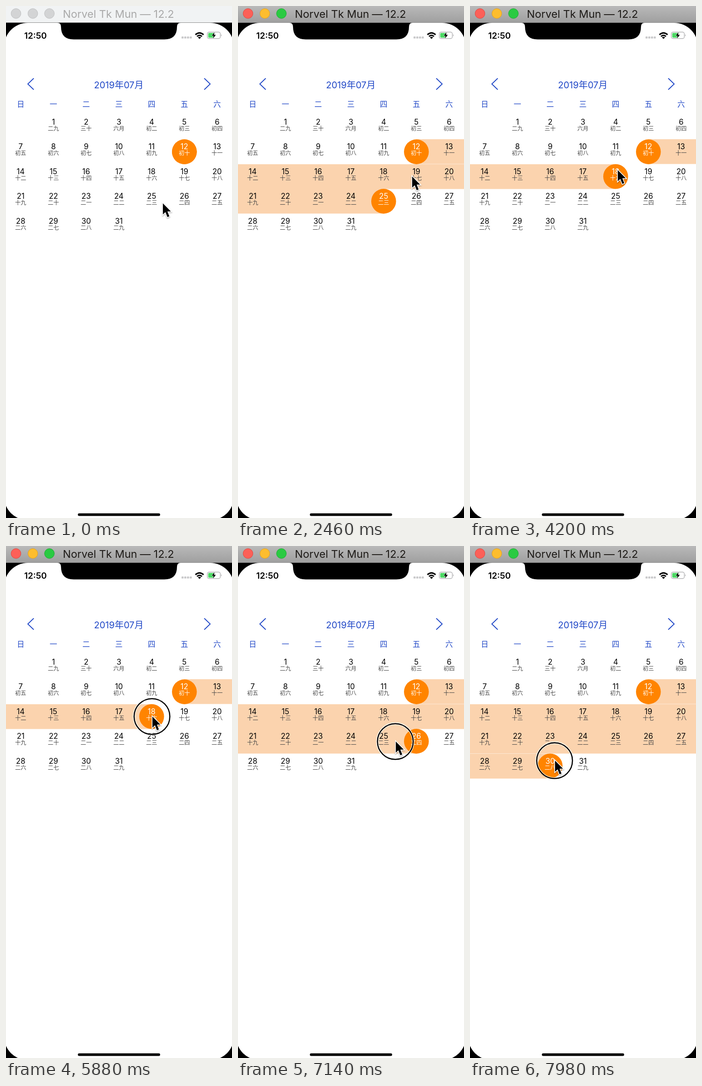
Write an HTML page that moves like this. It is 497 by 1126 pixels and loops after 8 s.

```html
<!DOCTYPE html>
<html lang="zh">
<head>
<meta charset="utf-8">
<style>
html, body { margin: 0; width: 100%; height: 100%; overflow: hidden; background: #fff; }
svg { display: block; width: 497px; height: 1126px; }
text { font-family: Inter, "Noto Sans CJK SC", "Noto Sans CJK", sans-serif; }
.mid { text-anchor: middle; }
.blue { fill: #2148c7; }
.day { font-size: 16.6px; }
.lunar { font-size: 12.2px; font-weight: 300; }
.title { font-size: 23.5px; }
</style>
</head>
<body>
<svg viewBox="0 0 497 1126" xmlns="http://www.w3.org/2000/svg">
  <defs>
    <linearGradient id="metal" x1="0" y1="0" x2="0" y2="1">
      <stop offset="0" stop-color="#b9b9b9"/><stop offset="1" stop-color="#9f9f9f"/>
    </linearGradient>
    <filter id="shade" x="-50%" y="-30%" width="200%" height="170%">
      <feDropShadow dx="0" dy="1.5" stdDeviation="1.3" flood-opacity=".4"/>
    </filter>
  </defs>
  <rect width="497" height="1126"/>
  <rect id="bar" width="497" height="36.5"/>
  <rect y="36" width="497" height="1" fill="#8c8c8c"/>
  <g id="lights"></g>
  <g id="title" class="title">
    <text x="125" y="26">Norvel Tk Mun</text>
    <text x="294.5" y="26">— 12.2</text>
  </g>
  <rect x="-4.5" y="37" width="506" height="1094" rx="53" fill="#fff"/>
  <path d="M113 37Q121 37 121 46Q121 73.500 149 73.500H348Q376 73.500 376 46Q376 37 384 37Z"/>
  <text x="40" y="72" font-size="18.8" font-weight="600">12:50</text>
  <g fill="#c9c9cb">
    <rect x="386" y="67" width="4.6" height="4.6" rx="1.2"/><rect x="392" y="67" width="4.6" height="4.6" rx="1.2"/>
    <rect x="398" y="67" width="4.6" height="4.6" rx="1.2"/><rect x="404" y="67" width="4.6" height="4.6" rx="1.2"/>
  </g>
  <g fill="none" stroke="#000" stroke-width="3">
    <path d="M416.5 63.2Q425.5 55 434.5 63.2"/><path d="M420 67Q425.5 62 431 67"/>
  </g>
  <path d="M422 69Q425.5 66.5 429 69L425.5 72.5Z"/>
  <rect x="442.7" y="57.3" width="28.6" height="14.4" rx="4" fill="#fff" stroke="#a5a5a7" stroke-width="1.2"/>
  <rect x="444.7" y="59.3" width="13.5" height="10.4" rx="2" fill="#4cd964"/>
  <path d="M473 62Q475.5 64.5 473 67Z" fill="#a5a5a7"/>
  <path d="M458.5 57.5L452.5 65.5H456.5L455 71.5L461.5 63.5H457.5Z" stroke="#fff" stroke-width="1" paint-order="stroke"/>
  <g fill="none" stroke="#2148c7" stroke-width="1.9">
    <path d="M61 159L48 171.5L61 184"/><path d="M436 159L449 171.5L436 184"/>
  </g>
  <text class="mid blue" x="248" y="181" font-size="20">2019年07月</text>
  <g id="bands" fill="#fbd3ae"></g>
  <g fill="#ff8400"><circle id="from" r="27.3"/><circle id="to" r="27.3"/></g>
  <g id="grid"></g>
  <rect x="158" y="1115.7" width="181" height="5.8" rx="2.9"/>
  <g id="ring" fill="none">
    <circle r="39.4" stroke="#fff" stroke-width="5.5" stroke-opacity=".75"/>
    <circle r="39.3" stroke="#000" stroke-width="2.5"/>
  </g>
  <path id="arrow" filter="url(#shade)" stroke="#fff" stroke-width="3" paint-order="stroke" d="M0 0V24.5L5.600 19.300L10 30.200L14.200 28.400L10 17.800H17.500Z"/>
</svg>
<script>
const NS = 'http://www.w3.org/2000/svg';
const $ = id => document.getElementById(id);
function add(parent, tag, attrs, text) {
  const el = document.createElementNS(NS, tag);
  for (const k in attrs) el.setAttribute(k, attrs[k]);
  if (text) el.textContent = text;
  parent.appendChild(el);
  return el;
}

const LOOP = 8000, STEP = 60, LEFT = 32.3, COL = 72, ROW = 54.4, TOP = 239, START = 12;
const NUM = '〇一二三四五六七八九十';
const colX = d => LEFT + COL * (d % 7);
const rowY = d => TOP + ROW * Math.floor(d / 7);

function lunar(d) {
  if (d < 4) return ['二九', '三十', '六月'][d - 1];
  const n = d - 2;
  if (n <= 10) return '初' + NUM[n];
  if (n < 20) return '十' + NUM[n - 10];
  return '二' + NUM[n - 20 || 10];
}

[...'日一二三四五六'].forEach((c, i) =>
  add($('grid'), 'text', { class: 'mid blue', x: colX(i), y: 221.5, 'font-size': 16.5 }, c));
const days = [];
for (let d = 1; d <= 31; d++) {
  const x = colX(d), y = rowY(d);
  days[d] = [
    add($('grid'), 'text', { class: 'mid day', x, y: y + 22 }, String(d)),
    add($('grid'), 'text', { class: 'mid lunar', x, y: y + 35 }, lunar(d))
  ];
}
const bands = [1, 2, 3, 4].map(r =>
  add($('bands'), 'rect', { y: Math.round(TOP + ROW * r), height: Math.round(ROW) + 0.5 }));
const lights = [22, 59, 95.5].map(cx =>
  add($('lights'), 'circle', { cx, cy: 16.5, r: 10.8, 'stroke-width': 1 }));

// pointer track: time, x, y
const track = [
  [0, 345, 433], [420, 348, 437], [840, 337, 433], [960, 333, 430], [1080, 331, 422],
  [1620, 340, 412], [2460, 383, 374], [2820, 326, 370], [3060, 323, 368], [4200, 325, 360],
  [5400, 324, 371], [5880, 322, 374], [6120, 380, 377], [6360, 452, 385], [6600, 462, 416],
  [6840, 430, 432], [7080, 365, 431], [7140, 347, 429], [7560, 240, 448], [7800, 204, 463],
  [7980, 187, 471]
];
function pointer(t) {
  let i = 1;
  while (i < track.length - 1 && track[i][0] < t) i++;
  const [a, ax, ay] = track[i - 1], [b, bx, by] = track[i];
  const k = Math.min(1, (t - a) / (b - a));
  return [ax + (bx - ax) * k, ay + (by - ay) * k];
}

function endDay(t) {
  if (t < 1020) return START;
  if (t < 3000) return 25;
  if (t < 5940) return 18;
  const [x, y] = pointer(t - STEP);
  return 7 * Math.floor((y - TOP) / ROW) + Math.floor((x - LEFT) / COL + 0.5);
}

const within = (t, a, b) => t >= a && t < b;

function draw(ms) {
  const t = Math.floor(ms / STEP) * STEP;
  const active = t >= 900, end = endDay(t);

  $('bar').setAttribute('fill', active ? 'url(#metal)' : '#f1f3f4');
  $('title').setAttribute('fill', active ? '#1d1a17' : '#a9a9a9');
  lights.forEach((el, i) => {
    el.setAttribute('fill', active ? ['#fc6058', '#fdbd2e', '#2aca42'][i] : '#d3d4d5');
    el.setAttribute('stroke', active ? ['#dc4a43', '#dba02a', '#20ab34'][i] : '#bfc0c1');
  });

  const endRow = Math.floor(end / 7);
  bands.forEach((el, i) => {
    const row = i + 1;
    const x = row === 1 ? colX(START) : 0;
    const right = row < endRow ? 497 : row === endRow ? colX(end) : x;
    el.setAttribute('x', x);
    el.setAttribute('width', Math.max(0, right - x));
  });
  [['from', START], ['to', end]].forEach(([id, d]) => {
    $(id).setAttribute('cx', colX(d));
    $(id).setAttribute('cy', rowY(d) + ROW / 2);
  });
  days.forEach(([num, sub], d) => {
    const on = d === START || d === end;
    num.setAttribute('fill', on ? '#fff' : '#000');
    sub.setAttribute('fill', on ? '#fff' : '#444');
  });

  const [x, y] = pointer(t);
  const pressed = within(t, 900, 1020) || within(t, 2880, 3000) || t >= 5700;
  $('ring').setAttribute('transform', `translate(${x - 1} ${y + 1})`);
  $('ring').setAttribute('visibility', pressed ? 'visible' : 'hidden');
  $('arrow').setAttribute('transform', `translate(${x} ${y + 1})`);
}

const begin = performance.now();
function tick() {
  draw((performance.now() - begin) % LOOP);
  requestAnimationFrame(tick);
}
draw(0);
requestAnimationFrame(tick);
</script>
</body>
</html>
```
